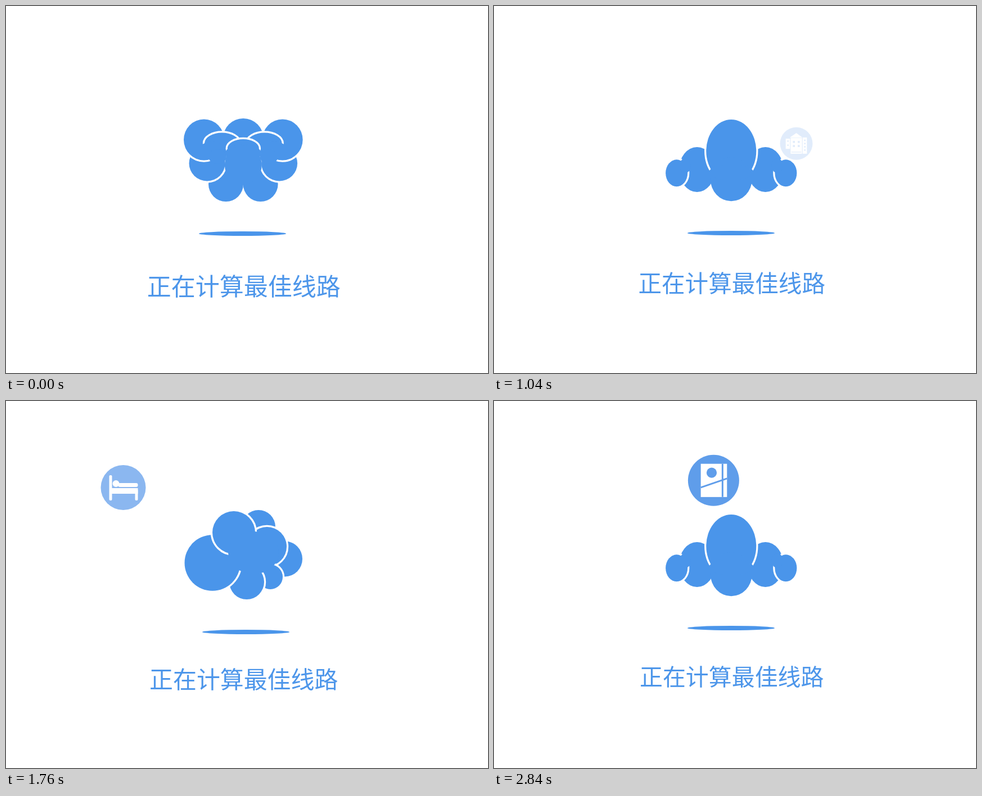
An HTML page that plays this animation: 857 px wide and 653 px high, repeating every 2.88 s.

```html
<!DOCTYPE html>
<html lang="zh-CN">
<head>
<meta charset="utf-8">
<style>
  html, body { margin: 0; width: 100%; height: 100%; overflow: hidden; background: #fff; }
  svg { display: block; width: 100vw; height: 100vh; }
  text { font: 300 43px "Noto Sans CJK SC", "Noto Sans CJK", sans-serif; text-anchor: middle; fill: #4d96ea; }
  .blue { fill: #4a95ea; }
  .outlined { stroke: #fff; stroke-width: 6.4; paint-order: stroke; }
  .icon { fill: #fff; }
  .icon .b { fill: #4a90e8; }
  .icon .line { fill: none; stroke: #4a90e8; stroke-width: 2.6; }
</style>
</head>
<body>
<svg viewBox="0 0 857 653">
  <g id="icons"></g>
  <g id="clouds"></g>
  <ellipse id="shadow" class="blue" rx="77.7" ry="4"/>
  <g id="label"><text y="16.4">正在计算最佳线路</text></g>
</svg>
<script>
const LOOP = 2880, FRAME = 40, ICON_TIME = 480;
const POSE_TIME = 366, POSE_OFFSET = 70;
const AXIS = 421.8;
const byId = id => document.getElementById(id);

const blob = (x, y, rx, ry, outlined) =>
  `<ellipse class="blue${outlined ? ' outlined' : ''}" cx="${x}" cy="${y}" rx="${rx}" ry="${ry}"/>`;
const edged = (x, y, rx, ry) => blob(x, y, rx, ry, true);
const pair = (draw, x, ...rest) => draw(x, ...rest) + draw(2 * AXIS - x, ...rest);

// Blobs are painted back to front; the last plain ones hide inner outlines.
const poses = [
  { shadow: [420.5, 405], shape: [
    blob(AXIS, 236, 36, 36),
    pair(blob, 391, 317, 31, 31),
    pair(edged, 357.5, 280, 32, 31.5),
    pair(edged, 352, 238, 36, 36.5),
    pair(edged, 384, 244, 31, 18.5),
    edged(AXIS, 253, 28, 16),
    pair(blob, 366, 256, 22, 15),
    pair(blob, 376, 268, 16, 13),
    blob(AXIS, 262, 32, 16),
    blob(AXIS, 283, 33, 35)
  ] },
  { shadow: [426.5, 411], shape: [
    blob(449, 224, 30, 30),
    blob(496, 281, 31, 31.5),
    edged(464, 259, 35, 35),
    edged(470, 313, 22, 22),
    edged(428, 322, 31, 31),
    edged(367, 288, 49.5, 49.7),
    edged(405, 234, 38, 38),
    blob(440, 270, 45, 38)
  ] },
  { shadow: [426, 408], shape: [
    blob(AXIS, 251, 54, 54),
    pair(blob, 369, 323, 20, 20),
    blob(AXIS, 330, 34, 21.5),
    pair(edged, 361, 275, 33.5, 33.5),
    edged(AXIS, 285, 43, 37),
    pair(blob, 383, 292, 8, 8),
    blob(AXIS, 310, 40, 24)
  ] },
  { shadow: [421.5, 404], shape: [
    pair(blob, 361, 291, 32, 40),
    pair(edged, 324.7, 297.3, 19.5, 24),
    pair(blob, 340, 284, 10, 13),
    edged(AXIS, 258, 44.5, 56),
    blob(AXIS, 308, 37, 39.3),
    blob(AXIS, 296, 40, 14)
  ] }
];

const box = (x, y, w, h, cls = '', r = 0) =>
  `<rect class="${cls}" x="${x}" y="${y}" width="${w}" height="${h}" rx="${r}"/>`;
const dot = (x, y, r, cls = '') => `<circle class="${cls}" cx="${x}" cy="${y}" r="${r}"/>`;
const path = (d, cls = '') => `<path class="${cls}" d="${d}"/>`;
const wheel = x => dot(x, 10, 6.5, 'b') + dot(x, 10, 5.5) + dot(x, 10, 2.8, 'b');
const panes = (xs, ys, size) =>
  xs.flatMap(x => ys.map(y => box(x - size / 2, y - size / 2, size, size, 'b'))).join('');

const car =
  path('M-26 11V6C-25 1-20-2-14-3C-12-11-8-15 3-15C11-15 15-10 18-4C24-2 26 1 25 11Z') +
  path('M-9-3C-8-8-6-10 0-10V-3ZM3-10C9-10 11-8 12-3H3Z', 'b') +
  box(-6, 1, 8, 2, 'b') + box(5, 1, 8, 2, 'b') + wheel(-12) + wheel(13);
const suitcase =
  path('M-10-10V-22Q-10-25-7-25H6Q9-25 9-22V-10H5V-21H-6V-10Z') +
  box(-17, -11, 33, 37, '', 5) + box(-11, -4.5, 22, 3, 'b') + box(-11, 15.5, 22, 3, 'b');
const building =
  path('M-16-15L0-26L15-15Z') + box(-14, -14, 28, 39) +
  box(-26, -12, 10.5, 25) + box(15.5, -15, 10.5, 40) +
  panes([-6, 6], [-4, 6], 5) + panes([-20.5], [-6, 4], 3.5) +
  panes([21], [-8, 0, 8, 16], 3.5) + box(-12, 20, 24, 1.8, 'b');
const bed =
  box(-25, -22, 5, 45, '', 2) + box(-22, 1, 48, 10) + box(21, 3, 5, 20, '', 2) +
  dot(-13, -7, 6) + box(-9, -8, 35, 7, '', 3);
const plane = path('M0-27C4-27 5-22 5-17V-7L26 3V8L5 5L4 17L14 23V26H-14V23' +
  'L-4 17L-5 5L-26 8V3L-5-7V-17C-5-22-4-27 0-27Z');
const book =
  box(-20, -26, 41, 52) + dot(-3, -12, 8, 'b') +
  path('M14-26V26M-20 11L21-3', 'line');

// Each route passes three points: at the start, at 320 ms and at 440 ms.
const heart = [418, 270];
const icons = [
  { art: car, route: [heart, [224, 171], [192, 176]] },
  { art: suitcase, route: [heart, [453.7, 127], [459, 125.5]] },
  { art: building, route: [[508, 262], [615, 223], [647.5, 229]] },
  { art: bed, route: [heart, [208.5, 154], [177, 144.5]] },
  { art: plane, route: [heart, [556.5, 156], [581.5, 135.5]] },
  { art: book, route: [heart, [394, 140], [390.4, 141.3]] }
];

byId('clouds').innerHTML = poses.map(p => `<g>${p.shape.join('')}</g>`).join('');
byId('icons').innerHTML = icons.map(i => `<g class="icon">${dot(0, 0, 40, 'b')}${i.art}</g>`).join('');
const cloudNodes = [...byId('clouds').children];
const iconNodes = [...byId('icons').children];

function along([a, b, c], p) {
  const wa = (p - 320) * (p - 440) / (320 * 440);
  const wb = p * (440 - p) / (320 * 120);
  const wc = p * (p - 320) / (440 * 120);
  return [0, 1].map(k => a[k] * wa + b[k] * wb + c[k] * wc);
}

// The label swings evenly between its largest and smallest size at these times.
const turns = [0, 400, 780, 1170, 1560, 1960, 2360, 2820, 3280];
function labelWidth(t) {
  const i = turns.findIndex(turn => turn > t) - 1;
  const u = (t - turns[i]) / (turns[i + 1] - turns[i]);
  return 341 - 17 * (i % 2 ? 1 - u : u);
}

function draw(t) {
  const pose = Math.floor((t + POSE_OFFSET) / POSE_TIME) % poses.length;
  cloudNodes.forEach((node, i) => node.style.display = i === pose ? '' : 'none');
  const [sx, sy] = poses[pose].shadow;
  byId('shadow').setAttribute('transform', `translate(${sx} ${sy})`);

  const active = Math.floor(t / ICON_TIME), p = t % ICON_TIME;
  iconNodes.forEach((node, i) => node.style.display = i === active ? '' : 'none');
  const [x, y] = along(icons[active].route, p);
  const scale = (25.3 + p * 0.0459) / 40;
  iconNodes[active].setAttribute('transform', `translate(${x} ${y}) scale(${scale})`);
  iconNodes[active].setAttribute('opacity', p / 500);

  const width = labelWidth(t);
  byId('label').setAttribute('transform',
    `translate(422.7 ${499 - (341 - width) / 2}) scale(${width / 341})`);
}

function tick() {
  draw(Math.floor(performance.now() % LOOP / FRAME) * FRAME);
  requestAnimationFrame(tick);
}
tick();
</script>
</body>
</html>
```
